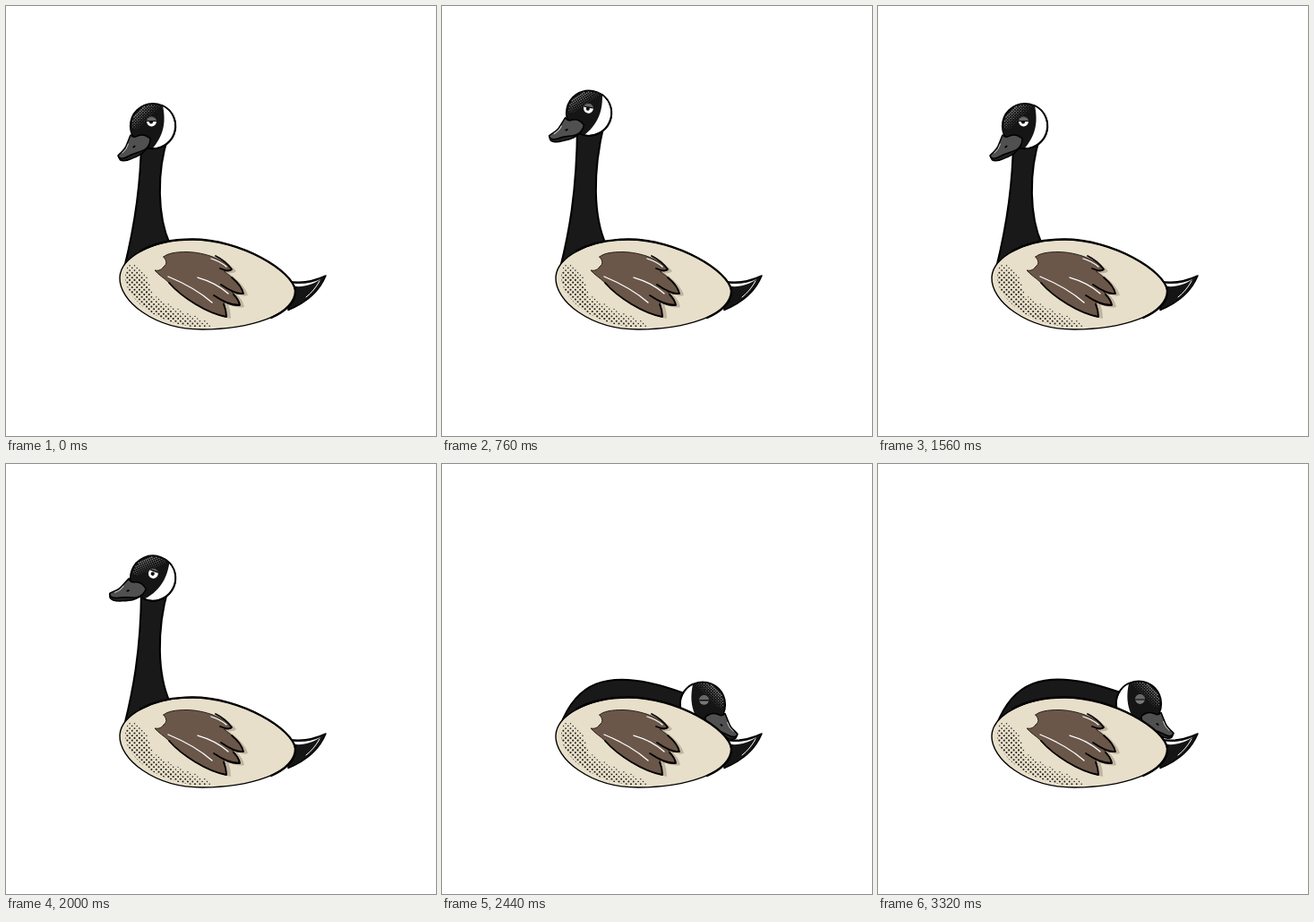
Animation, 480 px wide and 480 px high, one loop 3.36 s. Source, as an HTML page:

```html
<!DOCTYPE html>
<html lang="en">
<head>
<meta charset="utf-8">
<title>Sleepy goose</title>
<style>
  html, body { margin: 0; height: 100%; overflow: hidden; background: #fff; }
  svg { display: block; width: 100%; height: 100%; }
</style>
</head>
<body>
<svg viewBox="0 0 480 480" stroke-linejoin="round" stroke-linecap="round">
  <defs>
    <path id="bodyShape" d="M127 303C128 280 165 260.500 208 260.500C262 260.500 321 296 323 318C325 345 270 361 219 361C165 361 126 329 127 303Z"/>
    <path id="wingShape" d="M176 280C180 276 190 274.500 202 274.500C222 275 244 283 252 294Q249 297 243 296C252 302 263 312 265 321Q259 323 252 319Q260 327 261 334Q253 336 243 330Q246 339 246 347C224 343 196 325 182 309C176 303 170 300 166 295C171 296 174 294 176 291Q182 287 176 280Z"/>
    <clipPath id="shadeClip"><use href="#bodyShape" transform="translate(6 -2)"/></clipPath>
    <clipPath id="eyeClip"><circle r="5.400"/></clipPath>
  </defs>

  <g id="tail">
    <path d="M314 307C329 310 342 308 357 301C351 316 338 330 315 339.500Z" fill="#151515" stroke="#000" stroke-width="1.500"/>
    <path d="M320 309.500C330 311 342 309.500 352 304.500C344 310 333 314 323 313Z" fill="#fff"/>
    <path d="M350 307Q344 318 335 325" fill="none" stroke="#fff"/>
  </g>

  <path id="neck" fill="#191919" stroke="#000" stroke-width="2"/>

  <g id="head">
    <ellipse rx="25.300" ry="25.300" fill="#151515" stroke="#000" stroke-width="1.500"/>
    <path d="M11 -22.500C14 -8 14 8 0 24.500A25 25 0 0 0 11 -22.500Z" fill="#fff"/>
    <path d="M11 -22.800A25.300 25.300 0 0 1 0 25.300" fill="none" stroke="#000" stroke-width="1.800"/>
    <g id="shine" fill="#888"></g>
    <path d="M-38 34C-38 41 -29 39 -23 36C-16 33 -8 30 -4 20Z" fill="#222" stroke="#000" stroke-width="1.500"/>
    <path d="M-25 10Q-21 14 -17 11Q-10 8 -3 14C-3 22 -8 27 -14 28.500C-19 30 -23 31 -28 34C-33 37 -38 37 -39 33C-36 29 -31 27 -29 20Z" fill="#505050" stroke="#000" stroke-width="1.500"/>
    <path d="M-27.500 20Q-29 26 -34 30" fill="none" stroke="#ccc"/>
    <ellipse cx="-21" cy="23" rx="1.800" ry="1" fill="#000" transform="rotate(-35 -21 23)"/>
    <g transform="translate(-1.500 -5)" clip-path="url(#eyeClip)">
      <circle r="5.600" fill="#777"/>
      <rect id="white" x="-6" width="12" fill="#fff"/>
      <circle id="pupil" r="2.100" cx="-.5" cy="0.500" fill="#111"/>
      <rect id="lid" x="-6" y="-6" width="12" fill="#666"/>
      <path id="lash" d="M-6 0H6" stroke="#000" stroke-width="1.200"/>
    </g>
  </g>

  <use href="#bodyShape" fill="#e7dfca"/>
  <g id="dots" fill="#221f1b" clip-path="url(#shadeClip)"></g>
  <use href="#wingShape" fill="#bfb39f" transform="translate(5 2)"/>
  <use href="#wingShape" fill="#6a5749" stroke="#2a211b"/>
  <g fill="none" stroke="#000" stroke-width="1.800">
    <path d="M234 279Q246 285 252 294Q249 297 239 293"/>
    <path d="M252 303Q263 312 265 321Q256 322 240 311"/>
    <path d="M254 322Q260 328 261 334Q248 334 232 323"/>
    <path d="M243 333Q246 340 246 347C224 343 196 325 182 309"/>
  </g>
  <g fill="none" stroke="#fff" stroke-width="1.300">
    <path d="M229 282Q239 285 246 291"/>
    <path d="M214 303Q235 309 248 321"/>
    <path d="M181 302C198 309 214 317 230 331"/>
  </g>
  <g fill="none" stroke="#000">
    <use href="#bodyShape" stroke-width="1.400"/>
    <path d="M150 273.500C165 265 186 260.500 208 260.500C262 260.500 321 296 323 318C323 330 312 341 296 348" stroke-width="2.300"/>
  </g>
</svg>

<script>
const LOOP = 3360;
const $ = id => document.getElementById(id);
const mix = (a, b, k) => a + (b - a) * k;

// Eased value from [time, value] pairs
function at(keys, t) {
  const i = keys.findIndex(k => k[0] > t);
  if (i < 0) return keys[keys.length - 1][1];
  if (i === 0) return keys[0][1];
  const [t0, a] = keys[i - 1], [t1, b] = keys[i];
  const s = (t - t0) / (t1 - t0);
  return mix(a, b, s * s * (3 - 2 * s));
}

const height = [[200, 134], [760, 119.5], [1320, 134], [1720, 134], [1980, 127.5]];
const tilt = [[400, 0], [960, 15], [1160, 15], [1440, 0], [1720, 0], [1980, 21], [2060, 21], [2330, 0]];
const lidLine = [[80, -0.5], [480, -1], [1040, -1.5], [1500, -0.5], [1720, -0.5], [2000, -3], [2100, -3], [2320, 0.5]];
const lowerLid = [[2100, 6], [2320, 0.5]];
const fold = [[2060, 0], [2330, 1]];
const settle = [[2330, 268.5], [3200, 267.5]];

function addDot(parent, x, y, r) {
  const c = document.createElementNS("http://www.w3.org/2000/svg", "circle");
  c.setAttribute("cx", x);
  c.setAttribute("cy", y);
  c.setAttribute("r", r);
  parent.append(c);
}

// Upper edge of the shaded part of the belly
const shade = [[128, 286], [147, 289], [158, 302], [164, 322], [190, 337], [226, 352], [234, 363]];
function shadeTop(x) {
  const i = shade.findIndex(p => p[0] > x);
  const [x0, a] = shade[i - 1], [x1, b] = shade[i];
  return mix(a, b, (x - x0) / (x1 - x0));
}

for (let row = 0; row < 28; row++) {
  for (let x = 130 + row % 2 * 2.7; x < 233; x += 5.4) {
    const y = 287 + row * 2.7, depth = y - shadeTop(x);
    if (depth > 0) addDot($("dots"), x, y, Math.min(1.05, 0.65 + depth / 30));
  }
}

for (let row = 0; row < 17; row++) {
  for (let x = -24 + row % 2 * 1.6; x < 10; x += 3.2) {
    const y = -23 + row * 1.6;
    const size = (-0.7 * x - 0.7 * y - 9) / 14;
    if (size > 0 && Math.hypot(x, y) < 23.5) addDot($("shine"), x, y, 0.3 + 0.6 * size);
  }
}

function drawNeck(x, y, k) {
  const p = (x0, y0, x1, y1) => mix(x0, x1, k) + " " + mix(y0, y1, k) + " ";
  const end = (x0, y0, x1, y1) => p(x + x0, y + y0, x + x1, y + y1);
  $("neck").setAttribute("d",
    "M132 292C" + p(141, 256, 148, 250) + p(150.5, 210, 178, 222) + end(-13, 15, -22, -13) +
    "L" + end(17, 12, -17, 8) +
    "C" + p(168, 185, 230, 268) + p(169, 235, 200, 268) + "183 266L160 300Z");
}

function draw(t) {
  const k = at(fold, t), j = 1 - k;
  const x = 164 * j * j + 540 * k * j + 291 * k * k;
  const y = at(height, t) * j * j + 260 * k * j + at(settle, t) * k * k;
  const flip = mix(1, -1, Math.min(1, Math.max(0, (k - 0.3) / 0.3)));
  drawNeck(x, y, k);
  $("head").setAttribute("transform", `translate(${x} ${y}) scale(${flip} 1) rotate(${at(tilt, t)})`);

  const top = at(lidLine, t), low = at(lowerLid, t);
  $("white").setAttribute("y", top);
  $("white").setAttribute("height", Math.max(0, low - top));
  $("lid").setAttribute("height", top + 6);
  $("lash").setAttribute("transform", `translate(0 ${top})`);
  $("pupil").setAttribute("opacity", low - top > 2 ? 1 : 0);
}

const start = performance.now();
function tick() {
  draw((performance.now() - start) % LOOP);
  requestAnimationFrame(tick);
}
tick();
</script>
</body>
</html>
```
